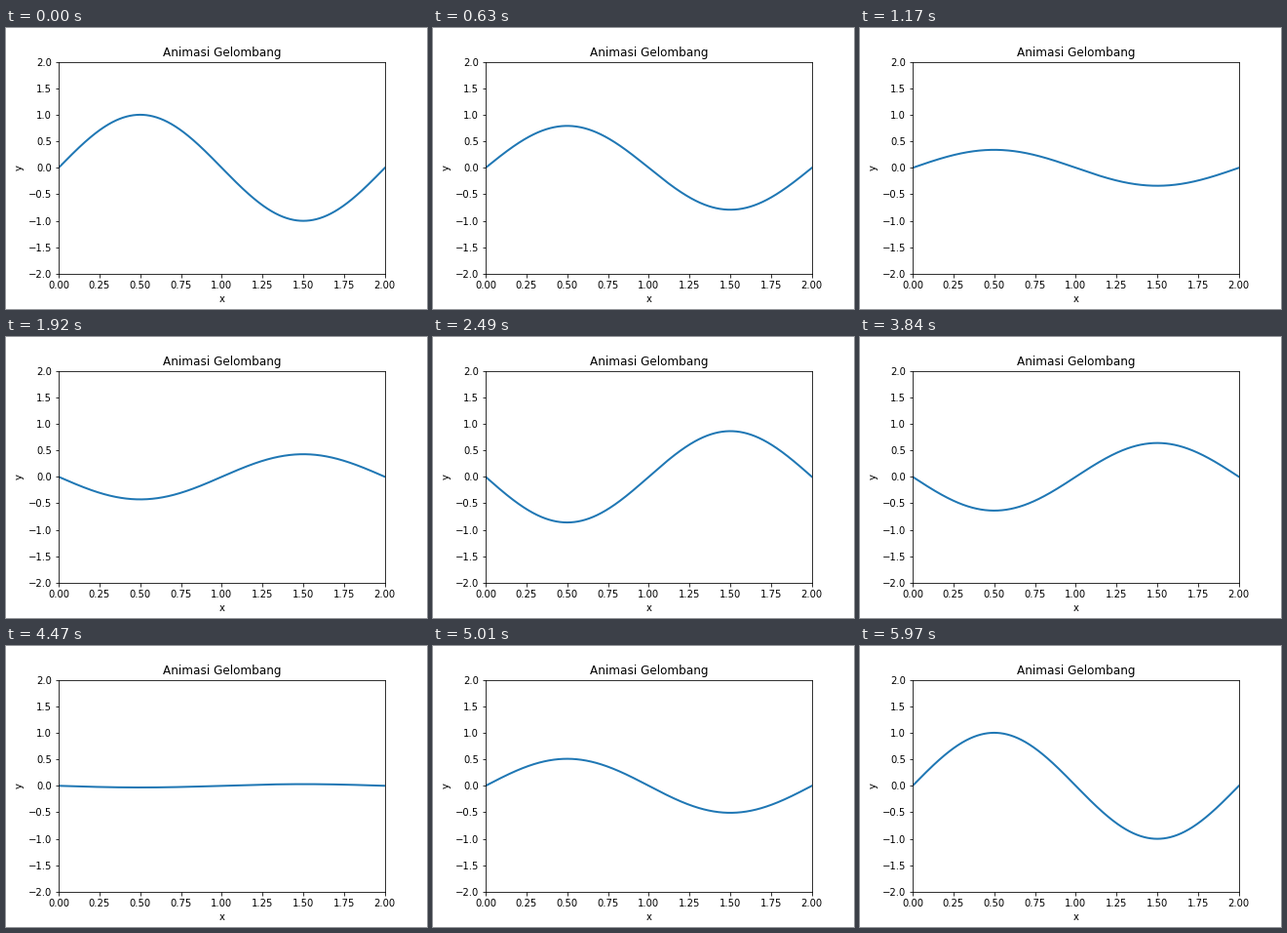
A matplotlib script that plays this animation: 432 px wide and 288 px high, repeating every 6000 ms.

```python
import numpy as np
import matplotlib.pyplot as plt
from matplotlib.animation import FuncAnimation

FRAMES = 200
INTERVAL = 30  # ms

plt.rcParams["font.family"] = "DejaVu Sans"
plt.rcParams["font.size"] = 10

fig, ax = plt.subplots(figsize=(6, 4), dpi=72, facecolor="white")
fig.subplots_adjust(left=0.125, right=0.9, bottom=0.125, top=0.88)
ax.set(xlim=(0, 2), ylim=(-2, 2), xlabel="x", ylabel="y")
ax.set_title("Animasi Gelombang", fontsize=12)

x = np.linspace(0, 2, 1000)
line, = ax.plot([], [], color="#1f77b4", lw=2)


def update(i):
    """Standing wave: a fixed sine whose amplitude swings once per loop."""
    line.set_data(x, np.cos(2 * np.pi * i / FRAMES) * np.sin(np.pi * x))
    return line,


anim = FuncAnimation(fig, update, frames=FRAMES, interval=INTERVAL,
                     repeat=True, repeat_delay=0)
plt.show()
```
